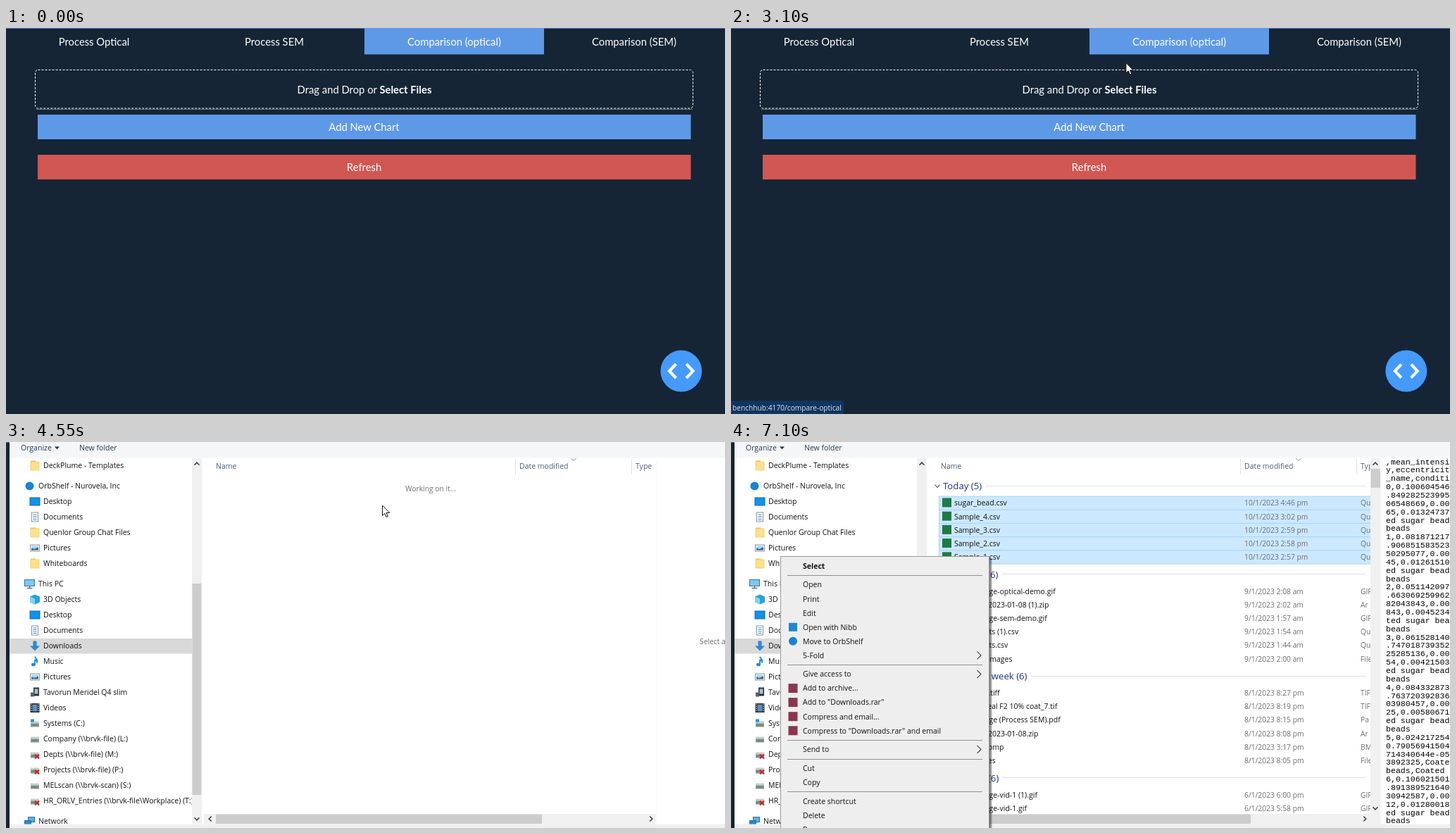
Animation, 1021 px wide and 548 px high, one loop 8000 ms. Source, as an HTML page:

```html
<!DOCTYPE html>
<html lang="en">
<head>
<meta charset="utf-8">
<title>File upload</title>
<style>
html, body { margin: 0; width: 100%; height: 100%; overflow: hidden; background: #152535; }
svg { display: block; width: 100vw; height: 100vh; }
text { white-space: pre; }
.page { font: 14.8px Lato, sans-serif; fill: #fff; text-anchor: middle; }
.ui { font: 10.5px "Open Sans", "Noto Sans", sans-serif; fill: #111; }
.grey { font-size: 10.3px; fill: #6d6d6d; }
.note { font-size: 10.3px; fill: #555; }
.bar { fill: #1e395b; }
.head { fill: #4c607a; }
.group { font-size: 13.2px; fill: #1e3287; stroke: #fff; stroke-width: 12px; paint-order: stroke; }
.mono { font: 11.6px "Liberation Mono", "DejaVu Sans Mono", monospace; fill: #000; }
.url { font-size: 10.2px; fill: #d5e4f4; }
</style>
</head>
<body>
<svg id="stage" viewBox="0 0 1021 548" preserveAspectRatio="none"></svg>
<script>
const LOOP = 8000;
const rect = (x, y, w, h, fill, more = '') =>
  `<rect x="${x}" y="${y}" width="${w}" height="${h}" fill="${fill}" ${more}/>`;
const path = (d, fill, stroke = 'none', w = 1, more = '') =>
  `<path d="${d}" fill="${fill}" stroke="${stroke}" stroke-width="${w}" ${more}/>`;
// Baselines sit on whole pixels.
const text = (x, y, s, cls = '', more = '') => `<text x="${x}" y="${Math.round(y)}" class="${cls}" ${more}>${s}</text>`;
const group = (id, body, more = '') => `<g id="${id}" ${more}>${body}</g>`;
const chevron = (x, y, dx, dy, color = '#404040', w = 1.6) => dx
  ? path(`M${x - dx} ${y - 3.5}L${x + dx} ${y}L${x - dx} ${y + 3.5}`, 'none', color, w)
  : path(`M${x - 3.5} ${y - dy}L${x} ${y + dy}L${x + 3.5} ${y - dy}`, 'none', color, w);
const shadow = (x, y, w, h) => [1, 2, 3, 4].map(d => rect(x + 3, y + 3, w + d - 3, h + d - 3, '#000', 'opacity=".17"')).join('');

// Icons are drawn around their own centre.
const drive = rect(-6, -1, 12, 6, '#8d9296') + rect(-6, -3, 12, 3, '#c9cdd0') + rect(-4, 1.5, 8, 1.5, '#3f9a55');
const sheet = rect(-4.5, -6.5, 9, 13, '#fff', 'stroke="#8a949c"');
const icons = {
  folder: rect(-6, -7, 7, 4, '#e9c35a') + rect(-6, -5.5, 12, 12, '#ffe08b', 'stroke="#eccb6c" stroke-width=".8"'),
  plain: path('M-4.5 -6.5H2L5 -3.5V6.5H-4.5Z M2 -6.5V-3.5H5', 'none', '#555', 1),
  gold: rect(-6, -6.5, 12, 13, '#e6bd4c'),
  dot: '<circle r="6" fill="#1683d8"/>',
  desktop: rect(-7, -5.5, 14, 11, '#1292e8', 'stroke="#0b6db5"'),
  doc: sheet + path('M-2.5 -3.5H2.5M-2.5 -1H2.5M-2.5 1.5H2.5M-2.5 4H2.5', 'none', '#4a8fc0', 1.2),
  pic: rect(-6.5, -4.5, 13, 9, '#fff', 'stroke="#8a949c"') + rect(-5, -3, 10, 6, '#a9d5f2') + path('M-5 3V0L-1 1.5 5 -1V3Z', '#33658c'),
  pc: rect(-7, -6, 14, 9, '#7cc7f4', 'stroke="#35789f"') + path('M-4 6H4M0 3V6', 'none', '#60737f', 1.5),
  cube: path('M0 -7L7 -4V4L0 7L-7 4V-4Z', '#27a3d9') + path('M0 -1V7L-7 4V-4Z', '#7fd4f2'),
  down: path('M-2.5 -7H2.5V0H7L0 7L-7 0H-2.5Z', '#2f88d0'),
  note: path('M0 -7C1 -3 5 -3 3 2C3 -1 1 -2 0 -2V4', 'none', '#1a8ed8', 1.8) + '<ellipse cx="-2" cy="4.5" rx="3" ry="2.3" fill="#1a8ed8"/>',
  phone: rect(-2, -7, 8, 12, '#2b3238') + rect(-.5, -5, 5, 7, '#9cc2dd') + rect(-6, 0, 5, 6, '#5b6166'),
  film: rect(-6.5, -6.5, 13, 13, '#2a2a2a') + rect(-3.5, -5, 7, 10, '#5b8fc4') +
    path('M-5 -6V6M5 -6V6', 'none', '#ddd', 1.2, 'stroke-dasharray="1.5 1.5"'),
  sys: drive + rect(-6, -6, 5, 4, '#2093dc'),
  drive,
  off: drive + path('M0 0L6 6M6 0L0 6', 'none', '#d01f24', 2),
  net: rect(-2, -6, 9, 7, '#57b1e8', 'stroke="#2c6f9b"') + rect(-7, -1, 9, 7, '#2c87c8', 'stroke="#2c6f9b"'),
  csv: rect(-6.5, -6.5, 13, 13, '#1e7b45'),
  zip: rect(-6.5, -6.5, 13, 13, '#8b3550'),
  pdf: rect(-6, -6.5, 12, 13, '#d5362c'),
  img: sheet + rect(-3, -3, 6, 5, '#2b6cc0'),
  tiff: rect(-6, -4.5, 12, 9, '#fff', 'stroke="#999"') + path('M-4 3L-1 -2 1 1 3 -1 5 3Z', '#d4703a'),
  pad: rect(-5, -6, 10, 12, '#a9d4e5', 'stroke="#6d97a8"') + path('M-3 -3H3M-3 0H3M-3 3H3', 'none', '#fff', 1),
  code: rect(-6, -6, 12, 12, '#1f87d0')
};
const icon = (name, x, y) => name ? `<g transform="translate(${x} ${y})">${icons[name]}</g>` : '';

function page() {
  const tabs = ['Process Optical', 'Process SEM', 'Comparison (optical)', 'Comparison (SEM)'];
  const labels = tabs.map((s, i) => text([125, 381, 636.5, 892][i], 24.6, s)).join('');
  return `<g class="page">` + rect(0, 0, 1021, 548, '#152535') + rect(0, 0, 1021, 1, '#4a79ba') +
    rect(509, 0, 255, 37.5, '#5e99e8') + labels +
    path('M43 115.5H975', 'none', '#65717d') +
    rect(41.5, 59.5, 934, 54.5, 'none', 'rx="4" stroke="#fff" stroke-dasharray="3 2"') +
    text(509, 93, 'Drag and Drop or <tspan font-weight="bold">Select Files</tspan>') +
    rect(45, 123, 927.5, 35, '#5e99e8') + text(508.5, 146, 'Add New Chart') +
    rect(45, 180, 927.5, 35, '#d15752') + text(508.5, 203, 'Refresh') +
    '<circle cx="958.8" cy="487" r="29.4" fill="#449aff"/>' +
    group('code', path('M-7 -9.5L-16 0L-7 9.5M7 -9.5L16 0L7 9.5', 'none', '#fff', 4)) + '</g>';
}

// Rows: [label, icon, root, pinned]; a root row gets extra space above it.
function sidebar(rows, y, active) {
  return rows.map(([label, pic, root, pin], i) => {
    if (i) y += root ? 29 : 22;
    return (label === active ? rect(5, y - 10.5, 259, 21.5, '#d9d9d9') : '') +
      icon(pic, root ? 33.5 : 41, y) + text(root ? 46 : 53, y + 3.8, label) +
      (pin ? path(`M251 ${y + 4}l3 -3m-1.5 -2.5l4 4m-3 -3l3 -3l2.5 2.5l-3 3z`, '#777', '#777', 1) : '');
  }).join('');
}
const share = '\\\\brvk-file';
const firm = 'Nurovela, Inc', cloud = 'OrbShelf', chat = 'Quenlor Group Chat Files';
const quick = [['Quick access', 'plain', 1],
  ...['Documents', 'Downloads', 'Pictures', 'kvorel4', 'Molecular Data', 'Genomic Data'].map(s => [s, 'plain', 0, 1]),
  ...['dashboard', 'Sample 1 (Y20N anneal F2 10%)', 'Sample 3 (Y40N nonA F2 10%)', 'Sample 4 (Y40N nonA F2 15%)'].map(s => [s, 'plain']),
  [firm, 'plain', 1], ['DeckPlume - Templates', 'gold'], [`${cloud} - ${firm}`, 'plain', 1],
  ['Desktop', 'plain'], ['Documents', 'plain'], [chat, 'gold'], ['Pictures', 'plain'], ['Whiteboards', 'gold'],
  ['This PC', '', 1], ['Network', '', 1], ['Links', '', 1]];
const places = [['DeckPlume - Templates', 'folder'], [`${cloud} - ${firm}`, 'dot', 1],
  ['Desktop', 'desktop'], ['Documents', 'doc'], [chat, 'folder'], ['Pictures', 'pic'], ['Whiteboards', 'folder'],
  ['This PC', 'pc', 1], ['3D Objects', 'cube'], ['Desktop', 'desktop'], ['Documents', 'doc'], ['Downloads', 'down'],
  ['Music', 'note'], ['Pictures', 'pic'], ['Tavorun Meridel Q4 slim', 'phone'], ['Videos', 'film'],
  ['Systems (C:)', 'sys'], [`Company (${share}) (L:)`, 'drive'], [`Depts (${share}) (M:)`, 'off'],
  [`Projects (${share}) (P:)`, 'off'], ['MELscan (\\\\brvk-scan) (S:)', 'drive'],
  [`HR_ORLV_Entries (${share}\\Workplace) (T:)`, 'off'], ['Network', 'net', 1]];

const TOP = 86.5, STEP = 19.2;
const files = [
  ['Today (5)', '10/1/2023', 'sugar_bead.csv|4:46|csv', 'Sample_4.csv|3:02|csv', 'Sample_3.csv|2:59|csv',
    'Sample_2.csv|2:58|csv', 'Sample_1.csv|2:57|csv'],
  ['Yesterday (6)', '9/1/2023', 'micro-image-optical-demo.gif|2:08|img', cloud + '_2023-01-08 (1).zip|2:02|zip',
    'micro-image-sem-demo.gif|1:57|img', 'sem_results (1).csv|1:54|csv', 'sem_results.csv|1:44|csv', 'Coloured images|2:00|folder'],
  ['Earlier this week (6)', '8/1/2023', 'download.tiff|8:27|tiff', 'Y20N anneal F2 10% coat_7.tif|8:19|pad',
    'Micro-Image (Process SEM).pdf|8:15|pdf', cloud + '_2023-01-08.zip|8:08|zip', 'Image 10.bmp|3:17|img', 'SEM images|8:05|folder'],
  ['Last week (6)', '6/1/2023', 'micro-image-vid-1 (1).gif|6:00|img', 'micro-image-vid-1.gif|5:58|img']];
const kinds = { csv: 'Qu', zip: 'Ar', pdf: 'Pa', folder: 'File', tiff: 'TIF', pad: 'TIF', img: 'GIF' };

function fileList() {
  let y = TOP - 24, out = '';
  files.forEach(([title, day, ...rows]) => {
    out += path(`M301 ${Math.floor(y) + .5}H901`, 'none', '#d9dfec') + text(301, y + 4.8, title, 'group') +
      chevron(293, y, 0, 2, '#5a6fa8', 1.2);
    y += 24;
    rows.forEach(row => {
      const [name, hour, kind] = row.split('|');
      const half = day[0] === '9' ? 'am' : 'pm';
      out += icon(kind, 306.5, y - .5) + text(317, y + 3.8, name) +
        text(729, y + 3.8, `${day} ${hour} ${half}`, 'grey') +
        text(894, y + 3.8, name.endsWith('bmp') ? 'BM' : kinds[kind], 'grey');
      y += STEP;
    });
    y += 24.5 - STEP;
  });
  return out;
}
const rowMarks = () => [0, 1, 2, 3, 4].map(i =>
  rect(295.5, TOP - 9.4 + STEP * i, 614, STEP, 'none', `id="row${i}"`)).join('');

const csvLines = (',mean_intensi|y,eccentricit|_name,conditi|' +
  '0,0.100604546|.849282523995|06548669,0.00|65,0.01324737|ed sugar bead|beads|' +
  '1,0.081871217|.906851583523|50295077,0.00|45,0.01261510|ed sugar bead|beads|' +
  '2,0.051142097|.663069259962|82043843,0.00|843,0.0045234|ted sugar bea|beads|' +
  '3,0.061528140|.747018739352|25285136,0.00|54,0.00421503|ed sugar bead|beads|' +
  '4,0.084332873|.763720392836|03980457,0.00|25,0.00580671|ed sugar bead|beads|' +
  '5,0.024217254|0.79056941504|714340644e-05|3892325,Coate|beads,Coated |' +
  '6,0.106021501|.891389521640|30942587,0.00|12,0.01280018|ed sugar bead|beads').split('|');

// Horizontal scroll bar of the file pane.
const hbar = (thumb, end) => rect(281, 528, end - 281, 14.5, '#f0f0f0') + rect(298, 528.5, thumb - 298, 13.5, '#cdcdcd') +
  chevron(290, 535, -1.8) + chevron(end - 8, 535, 1.8);

function dialog() {
  return rect(5, -60, 1100, 680, '#fff') +
    group('quick', sidebar(quick, 47.3, 'This PC')) + group('places', sidebar(places, 33.5, 'Downloads')) +
    rect(264, 23, 14, 519, '#f0f0f0') + rect(264.5, 201, 13, 300, '#cdcdcd') + chevron(271, 31, 0, -1.8) + chevron(271, 535, 0, 1.8) +
    text(298, 38, 'Name', 'head') + text(729, 38, 'Date modified', 'head') + text(894, 38, 'Type', 'head') +
    path('M723.5 24V46M888.5 24V46', 'none', '#e2e2e2') + chevron(806, 25, 0, 1.5, '#888', 1) +
    group('busy', text(603, 70, 'Working on it...', 'grey', 'text-anchor="middle"') + hbar(761, 924)) +
    group('list', rowMarks() + fileList() + hbar(738, 908) +
      rect(908, 23, 14.5, 519.5, '#f0f0f0') + rect(908.5, 38, 13.5, 27, '#cdcdcd') +
      chevron(915, 31, 0, -1.8) + chevron(915, 520, 0, 1.8)) +
    rect(922.5, 23, 200, 519.5, '#fff') + path('M924 23V542', 'none', '#f3f3f3') +
    group('hint', text(985, 287, 'Select a file to preview.', 'grey')) +
    group('csv', csvLines.map((s, i) => text(930, 31.5 + i * 11.86, s, 'mono')).join('')) +
    rect(5, -60, 1100, 82.5, '#f5f6f7') + rect(5, 542.5, 1100, 80, '#f0f0f0') +
    group('tools', text(21, 12, 'Organize', 'bar') + path('M69 6.5H76L72.5 10.5Z', '#1e395b') + text(104, 12, 'New folder', 'bar'));
}

function tooltip() {
  const lines = ['Type: Quenlor Tably Comma Separated Values File', 'Size: 44.6 KB', 'Date modified: 10/1/2023 3:02 pm'];
  return shadow(437, 115, 257, 46) + rect(437.5, 115.5, 256, 45, '#fff', 'stroke="#767676"') +
    lines.map((s, i) => text(441.5, 128.2 + i * 13.5, s, 'note')).join('');
}

// Menu entries: label, optional icon, ">" for a submenu; "-" draws a rule.
function menu() {
  const items = ['Select', '-', 'Open', 'Print', 'Edit', 'Open with Nibb|code', `Move to ${cloud}|dot`, '5-Fold||>', '-',
    'Give access to||>', 'Add to archive...|zip', 'Add to "Downloads.rar"|zip', 'Compress and email...|zip',
    'Compress to "Downloads.rar" and email|zip', '-', 'Send to||>', '-', 'Cut', 'Copy', '-', 'Create shortcut', 'Delete', 'Rename'];
  let y = 176, out = shadow(70, 162, 297, 400) + rect(70.5, 162.5, 296, 400, '#eee', 'stroke="#9b9b9b"');
  items.forEach(item => {
    if (item === '-') {
      out += path(`M80 ${Math.round(y - 6.8) + .5}H357`, 'none', '#919191');
      y += 6.6;
      return;
    }
    const [label, pic, more] = item.split('|');
    out += icon(pic, 88, y) + text(102, y + 3.8, label, '', label === 'Select' ? 'font-weight="bold"' : '') +
      (more ? path(`M349.5 ${y - 5.5}l5.5 5.5l-5.5 5.5`, 'none', '#444', 1.2) : '');
    y += 20.05;
  });
  return out;
}

const stage = document.getElementById('stage');
stage.innerHTML = page() +
  group('status', rect(-3, 529, 10, 24, '#10365f', 'id="statusBox" rx="3"') + text(2, 542.5, '', 'url', 'id="statusText"'), 'class="ui"') +
  group('dialog', dialog(), 'class="ui"') + group('tip', tooltip(), 'class="ui"') + group('menu', menu(), 'class="ui"') +
  group('cursor',
    path('M.5 .5V15L3.8 11.9 6 17 8.3 16 6.1 11H10.8Z', '#fff', '#111', 1, 'id="arrow"') +
    path('M4 1.8a1.6 1.6 0 0 1 3.2 0V8l4.8 1.2c1.3 .4 1.8 1.2 1.6 2.6L12.6 18v2H5.4v-1.6L.8 12.6c-1 -1.4 .6 -2.9 2 -1.8L4 12Z',
      '#fff', '#222', .7, 'id="hand"'));
const el = {};
stage.querySelectorAll('[id]').forEach(n => el[n.id] = n);
const show = (id, on) => el[id].setAttribute('visibility', on ? 'inherit' : 'hidden');

// Pointer path: [time, x, y].
const track = [[440, 948, 478], [820, 640, 170], [1100, 463, 11], [1210, 470, 24], [1290, 470, 24], [1520, 410, 18],
  [1680, 410, 18], [1990, 418, 15], [2460, 588, 9], [2940, 589, 13], [3250, 535, 81], [3800, 535, 81], [4230, 534, 89.5],
  [4840, 534, 89.5], [5060, 437, 97], [5240, 437, 97], [5330, 427, 93.5], [6000, 427, 92], [6330, 380, 150],
  [6560, 367, 162], [6710, 367, 162], [7100, 890, 552]];
function pointer(t) {
  const i = track.findIndex(k => k[0] > t);
  if (i < 0) return track[track.length - 1].slice(1);
  if (!i) return track[0].slice(1);
  const [t0, x0, y0] = track[i - 1], [t1, x1, y1] = track[i];
  const u = (t - t0) / (t1 - t0), k = u * u * (3 - 2 * u);
  return [x0 + (x1 - x0) * k, y0 + (y1 - y0) * k];
}

function render(t) {
  const [x, y] = pointer(t);
  const overCode = Math.hypot(x - 958.8, y - 487) < 29 && t < 1000;
  const hand = overCode || (t < 3400 && y < 37);
  const shown = t >= 440 && t < 7100;
  show('hand', hand && shown);
  show('arrow', !hand && shown);
  el.cursor.setAttribute('transform', `translate(${x} ${y})`);
  el.code.setAttribute('transform', `translate(958.8 487) scale(${overCode ? 1.05 : 1})`);

  const far = t >= 2620;
  show('status', t >= 1760 && t < 3440);
  el.statusBox.setAttribute('width', far ? 163 : 103);
  el.statusText.textContent = 'benchhub:4170/' + (far ? 'compare-optical' : 'sem');

  // The window fades and grows in coarse steps.
  const step = Math.floor((t - 4330) / 70);
  const size = 1 - .018 * Math.max(0, 2 - step);
  const open = step >= 0, ready = t >= 4550, listed = t >= 4610;
  show('dialog', open);
  el.dialog.setAttribute('opacity', Math.max(0, Math.min(1, (step + 1) / 3)));
  el.dialog.setAttribute('transform', `translate(558 255) scale(${size}) translate(-558 -255)`);
  show('quick', open && !ready);
  show('places', ready);
  show('tools', ready);
  show('busy', open && !listed);
  show('list', listed);
  show('hint', open && t < 5850);
  show('csv', t >= 5850);
  show('tip', t >= 5180 && t < 5500);
  show('menu', t >= 6720);
  el.menu.setAttribute('opacity', Math.min(1, Math.max(0, (t - 6720) / 120)));

  const over = t < 6710 ? Math.floor((y - TOP + 9.6) / STEP) : -1;
  for (let i = 0; i < 5; i++) {
    const picked = t >= 6420 || (t >= 5790 && i === 0);
    el['row' + i].setAttribute('fill', picked ? '#cce8ff' : over === i ? '#e5f3ff' : 'none');
    el['row' + i].setAttribute('stroke', picked ? '#a6d6fb' : 'none');
  }
}

const start = performance.now();
function tick() {
  render((performance.now() - start) % LOOP);
  requestAnimationFrame(tick);
}
tick();
</script>
</body>
</html>
```
